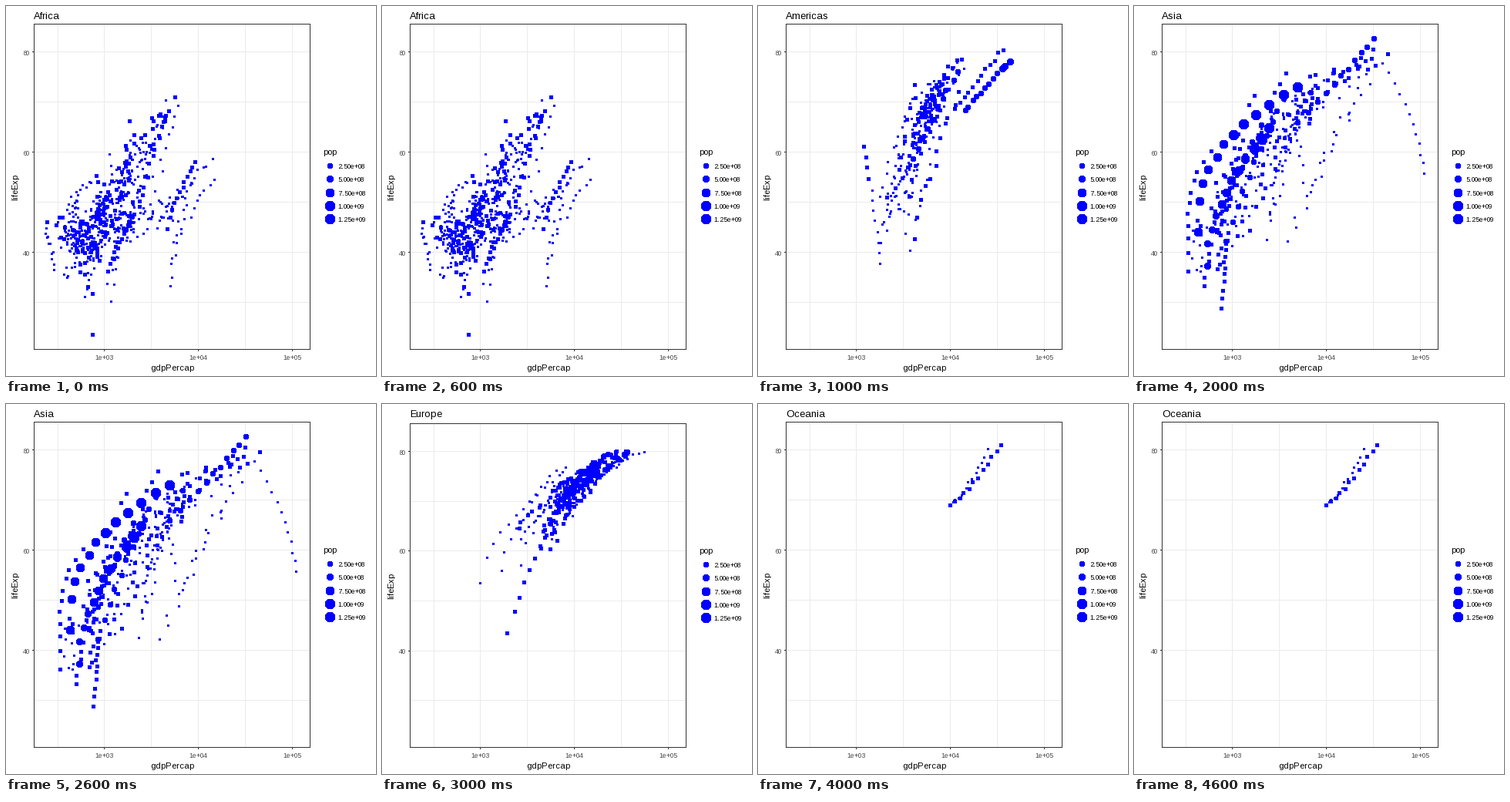
Recreate the animation shown at these times as a matplotlib script. Size 480 by 480 pixels, loop 5 s.

```python
import numpy as np
import matplotlib.pyplot as plt
from matplotlib.animation import FuncAnimation

plt.rcParams["font.family"] = "Liberation Sans"
plt.rcParams["text.hinting_factor"] = 1

SIZE, DPI = 480, 100
PT = 72 / DPI
BLUE, GRID, DARK, GREY = "#0000ff", "#ebebeb", "#333333", "#4d4d4d"
LEFT, RIGHT, BOTTOM = 36.5, 394.5, 445.5
XLIM, YLIM = (2.2486, 5.1888), (20.65, 85.55)
MAX_POP = 1319
U = np.linspace(0, 1, 12)


def nations(n, gdp, life, pop, wide=0, tall=(0, 0), bend=1, ease=.8, dip=0, when=0):
    """n countries that drift from the first gdp, life and pop to the second.

    wide and tall spread the countries, bend and ease shape the drift,
    dip is a short fall in life around the moment when.
    """
    def sample(rng):
        first, other, y_first, y_other = rng.normal(size=(4, n, 1))
        last = .6 * first + .8 * other
        y_last = .5 * last + .85 * y_other
        x0, x1 = np.log10(gdp)
        x = x0 + (x1 - x0) * U ** bend + wide * (first * (1 - U) + last * U)
        y = life[0] + (life[1] - life[0]) * U ** ease
        y = y + tall[0] * y_first * (1 - U) + tall[1] * y_last * U
        y -= dip * np.exp(-((U - when) / .07) ** 2)
        x += rng.normal(0, .008 + .12 * wide, x.shape)
        y += rng.normal(0, .15 + .1 * tall[0], y.shape)
        p = pop[0] * (pop[1] / pop[0]) ** U
        if wide:
            p = p * 10 ** rng.normal(0, .36, (n, 1))
        p = np.broadcast_to(p, x.shape)
        return x.ravel(), np.clip(y, 23.6, 82.6).ravel(), p.ravel()
    return sample


AFRICA = [
    nations(33, (720, 1120), (40, 52), (3.2, 9), .2, (3.6, 5.2)),
    nations(8, (2000, 5300), (47, 69), (2, 7), .12, (4, 3.5)),
    nations(6, (3300, 9000), (41, 54), (.6, 1.8), .15, (5, 4)),
    nations(1, (1419, 5581), (42, 71), (22, 80), ease=1),
    nations(1, (1077, 2014), (36, 47), (33, 135)),
    nations(1, (4725, 9270), (45, 58), (14, 44)),
    nations(1, (850, 250), (39, 46), (14, 65), bend=2),
    nations(1, (493, 863), (40, 47), (3, 9), dip=22, when=.727),
]
AMERICAS = [
    nations(15, (2750, 6000), (47, 71.5), (2.5, 9), .11, (5, 2.5)),
    nations(5, (5300, 11500), (62, 76.5), (3, 8), .1, (4, 1.5)),
    nations(1, (13990, 42951), (68.4, 78.2), (157, 301), ease=1),
    nations(1, (11367, 36319), (68.7, 80.6), (15, 33), ease=1),
    nations(1, (2109, 9066), (51, 72.4), (57, 190), bend=.8, ease=1),
    nations(1, (3478, 11978), (51, 76), (30, 109)),
    nations(1, (1840, 1202), (37.6, 61), (3, 8.5), ease=1),
]
ASIA = [
    nations(8, (680, 2000), (42, 66), (5, 15), .14, (4.5, 4)),
    nations(8, (2000, 5200), (49, 72), (4, 15), .17, (5, 1.8)),
    nations(5, (2400, 27000), (60, 79), (3, 11), .15, (4, 1.5)),
    nations(2, (4500, 22000), (42, 74), (.3, 2), .15, (4, 2)),
    nations(2, (684, 1900), (41, 65), (45, 160), .05, (2, 1), bend=1.6),
    nations(1, (430, 4959), (44, 73), (556, 1318), bend=1.7, ease=.65),
    nations(1, (547, 2452), (37.4, 64.7), (372, 1110), bend=1.5),
    nations(1, (750, 3541), (37.5, 70.6), (82, 223)),
    nations(1, (3217, 31656), (63, 82.6), (86, 127), bend=.7),
    nations(1, (108000, 40000), (55.6, 77.6), (.2, 2.5), bend=1.8, ease=1),
    nations(1, (779, 900), (28.8, 43.8), (8, 32)),
    nations(1, (369, 1714), (39, 60), (5, 14), bend=2, dip=17, when=.455),
    nations(1, (331, 800), (36, 62), (20, 48), bend=4),
]
EUROPE = [
    nations(11, (4600, 14500), (64.5, 75), (7, 10), .11, (2.5, 1.3)),
    nations(10, (8000, 32000), (69, 79.2), (5, 8), .1, (1.8, .7)),
    nations(5, (6500, 30000), (67, 80), (45, 65), .08, (1.5, .6)),
    nations(2, (1900, 6500), (57, 76), (.7, 2.5), .08, (2, 1), ease=.6),
    nations(1, (974, 7000), (53.8, 75), (2.8, 4.5), ease=.6),
    nations(1, (1969, 8458), (43.6, 71.8), (22, 71)),
]
OCEANIA = [
    nations(1, (10040, 34435), (69.1, 81.2), (8.7, 20), ease=1.3),
    nations(1, (10557, 25185), (69.4, 80.2), (2, 4), ease=1.3),
]

# title, countries, panel top; the descender in "Europe" lowers the panel
PAGES = [
    ("Africa", AFRICA, 23.5),
    ("Americas", AMERICAS, 23.5),
    ("Asia", ASIA, 23.5),
    ("Europe", EUROPE, 25.5),
    ("Oceania", OCEANIA, 23.5),
]


def cloud(groups, seed):
    rng = np.random.default_rng(seed)
    return [np.concatenate(c) for c in zip(*(g(rng) for g in groups))]


CLOUDS = [cloud(groups, 20 + i) for i, (_, groups, _) in enumerate(PAGES)]

fig = plt.figure(figsize=(SIZE / DPI, SIZE / DPI), dpi=DPI, facecolor="white")
ax = fig.add_axes([0, 0, 1, 1])


def px_x(v):
    return LEFT + (v - XLIM[0]) / (XLIM[1] - XLIM[0]) * (RIGHT - LEFT)


def px_y(v, top):
    return BOTTOM - (v - YLIM[0]) / (YLIM[1] - YLIM[0]) * (BOTTOM - top)


def pixel(v):
    return np.floor(v) + .5


def label(x, y, s, size, color="black", **kw):
    ax.text(x, y, s, fontsize=size * PT, color=color, **kw)


def line(xs, ys, color):
    ax.plot(xs, ys, color=color, lw=PT, antialiased=False, snap=False,
            solid_capstyle="projecting", solid_joinstyle="miter")


def dots(x, y, pop):
    """Hard-edged discs whose radius is a whole number of pixels."""
    mm = 1 + 5 * np.sqrt(pop / MAX_POP)
    radius = np.floor(.375 * (2.845 * mm + .94) + .21)
    ax.scatter(pixel(x), pixel(y), s=((2 * radius + .5) * PT) ** 2, c=BLUE,
               linewidths=0, antialiased=False, snap=False, zorder=3)


def draw(i):
    ax.clear()
    ax.set(xlim=(0, SIZE), ylim=(SIZE, 0))
    ax.axis("off")
    title, _, top = PAGES[i]
    shift = (top - 23.5) / 2

    for v in np.arange(2.5, 5.1, .5):
        x = pixel(px_x(v))
        line([x, x], [top, BOTTOM], GRID)
    for v in range(30, 81, 10):
        y = pixel(px_y(v, top))
        line([LEFT, RIGHT], [y, y], GRID)

    line([LEFT, RIGHT, RIGHT, LEFT, LEFT], [top, top, BOTTOM, BOTTOM, top], DARK)
    for v in (3, 4, 5):
        x = pixel(px_x(v))
        line([x, x], [BOTTOM, BOTTOM + 2], DARK)
        label(x, 459, f"1e+0{v}", 9, GREY, ha="center")
    for v in (40, 60, 80):
        y = pixel(px_y(v, top))
        line([LEFT - 2, LEFT], [y, y], DARK)
        label(31, y + 4, str(v), 9, GREY, ha="right")

    label(36, 17, title, 13)
    label(215.3, 473, "gdpPercap", 11, ha="center")
    label(15, 235 + shift, "lifeExp", 11, rotation=90, rotation_mode="anchor",
          ha="center", va="baseline")

    label(411, 193 + shift, "pop", 11)
    key = np.arange(1, 6)
    key_y = 190.3 + 17.28 * key + shift
    for k, y in zip(key, key_y):
        label(430, np.floor(y) + 4, f"{2.5e8 * k:.2e}", 9)

    x, y, pop = CLOUDS[i]
    dots(np.append(px_x(x), np.full(5, 420)),
         np.append(px_y(y, top), key_y),
         np.append(pop, 250 * key))
    return []


anim = FuncAnimation(fig, draw, frames=len(PAGES), init_func=lambda: draw(0),
                     interval=1000, repeat=True, repeat_delay=0)
plt.show()
```
